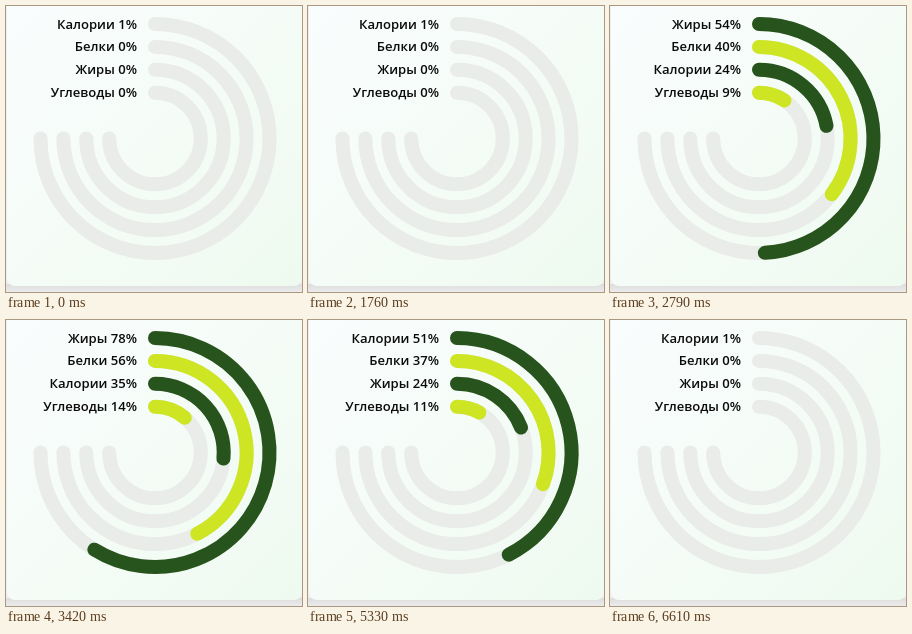
Write an HTML page that moves like this. It is 296 px wide and 286 px high and loops after 6.64 s.

```html
<!DOCTYPE html>
<html lang="ru">
<head>
<meta charset="utf-8">
<style>
  html, body { margin: 0; width: 100%; height: 100%; overflow: hidden; background: #eeeeee; }
  svg { display: block; width: 296px; height: 286px; }
  text { font: 600 13.1px "Open Sans", "Noto Sans", sans-serif; fill: #0b0b0b; text-anchor: end; }
  path { fill: none; stroke-width: 14; stroke-linecap: round; }
</style>
</head>
<body>
<svg id="stage" viewBox="0 0 296 286">
  <defs>
    <linearGradient id="card" x1="0" y1="0" x2="1" y2="1">
      <stop offset="0" stop-color="#fafdfe"/>
      <stop offset=".5" stop-color="#f5fcf7"/>
      <stop offset="1" stop-color="#eefaf0"/>
    </linearGradient>
    <linearGradient id="shade" x1="0" y1="0" x2="0" y2="1">
      <stop offset="0" stop-color="#dcdddc"/>
      <stop offset="1" stop-color="#ebebeb"/>
    </linearGradient>
  </defs>
  <rect y="278" width="296" height="8" fill="url(#shade)"/>
  <rect x="1" y="-20" width="295" height="300" rx="8" fill="url(#card)"/>
</svg>
<script>
const LOOP = 6640;
const RISE = { start: 1800, time: 1350 };
const RISE_TEXT = { start: 1791, time: 1420 };
const FALL = { start: 4842, time: 1385 };
const CENTER = { x: 149, y: 132.5 };
const FULL_TURN = 270;

const rings = [
  { share: 78.5, up: 78, down: [78, 0.9], names: ['Жиры', 'Калории'] },
  { share: 56.5, up: 56.9, down: [57, 0], names: ['Белки', 'Белки'] },
  { share: 35.2, up: 35.2, down: [36.6, 0], names: ['Калории', 'Жиры'] },
  { share: 15, up: 14.1, down: [15.7, 0], names: ['Углеводы', 'Углеводы'] }
];

const stage = document.getElementById('stage');

function add(tag, attrs) {
  const node = document.createElementNS('http://www.w3.org/2000/svg', tag);
  for (const key in attrs) node.setAttribute(key, attrs[key]);
  return stage.appendChild(node);
}

function arcPath(radius, degrees) {
  const a = degrees * Math.PI / 180;
  const x = CENTER.x + radius * Math.sin(a);
  const y = CENTER.y - radius * Math.cos(a);
  return `M${CENTER.x} ${CENTER.y - radius}A${radius} ${radius} 0 ${degrees > 180 ? 1 : 0} 1 ${x} ${y}`;
}

rings.forEach((ring, i) => {
  ring.radius = 114.5 - 22.9 * i;
  add('path', { d: arcPath(ring.radius, FULL_TURN), stroke: '#e9ece9' });
  ring.bar = add('path', { stroke: i % 2 ? '#cde522' : '#27531c' });
  ring.label = add('text', { x: 131, y: CENTER.y - ring.radius + 4.5 });
});

const progress = (t, span) => Math.min(1, Math.max(0, (t - span.start) / span.time));
const ease = u => (1 - Math.cos(Math.PI * u)) / 2;

function draw(t) {
  const rising = t >= RISE_TEXT.start && t < FALL.start;
  const fill = rising ? ease(progress(t, RISE))
    : t >= FALL.start ? 1 - ease(progress(t, FALL)) : 0;
  const fallen = t >= FALL.start ? progress(t, FALL) : 1;

  for (const ring of rings) {
    const [from, to] = ring.down;
    const value = rising
      ? Math.floor(ring.up * progress(t, RISE_TEXT))
      : Math.ceil(from * (1 - fallen) + to * fallen);
    ring.label.textContent = `${ring.names[rising ? 0 : 1]} ${value}%`;
    ring.bar.setAttribute('d', arcPath(ring.radius, ring.share / 100 * FULL_TURN * fill));
    ring.bar.style.display = fill > 0.0005 ? '' : 'none';
  }
}

const began = performance.now();
function tick() {
  draw((performance.now() - began) % LOOP);
  requestAnimationFrame(tick);
}
tick();
</script>
</body>
</html>
```
